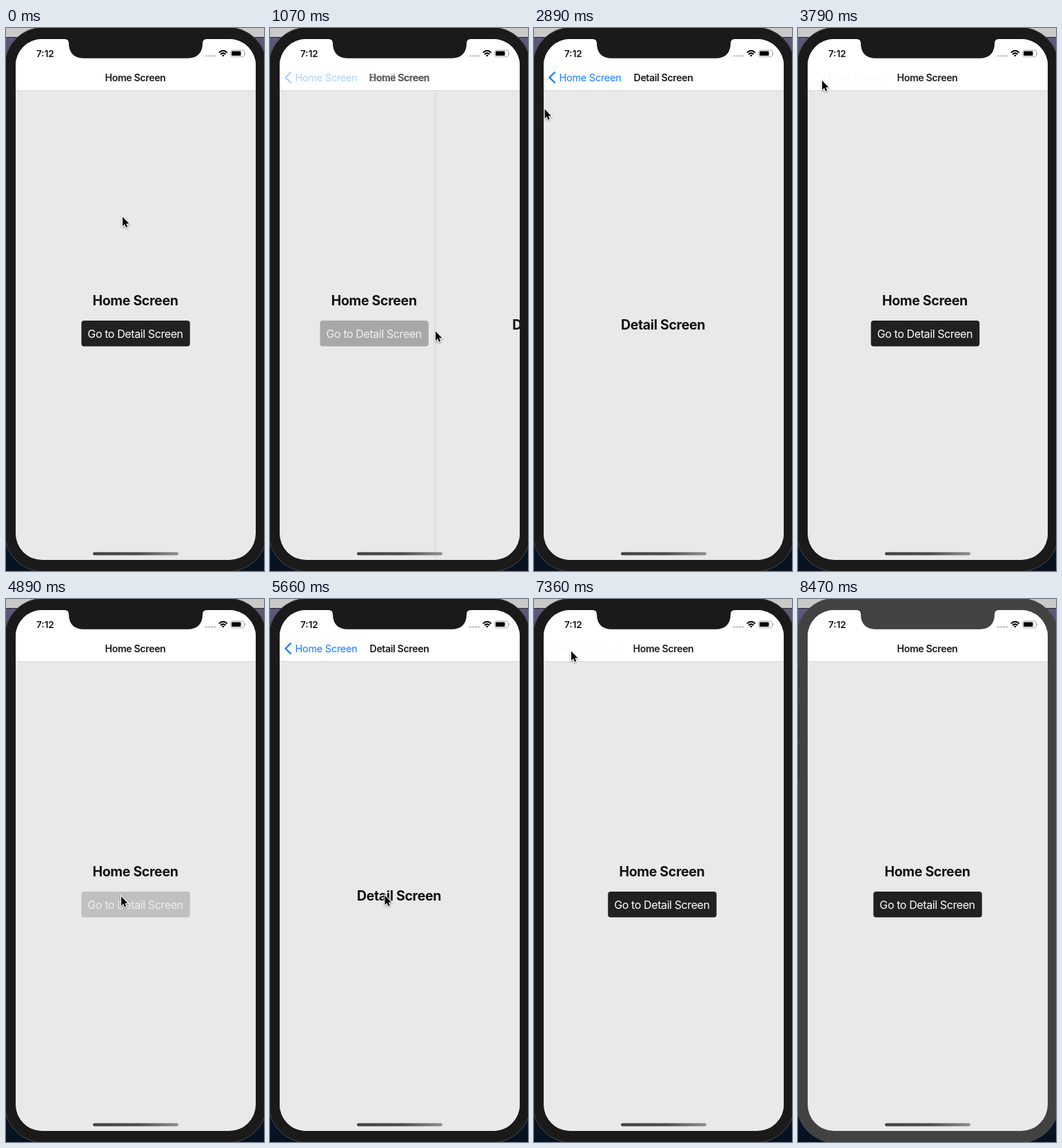
These frames come from a looping animation (374x785 px, 9020 ms). An HTML page:

```html
<!DOCTYPE html>
<html lang="en">
<head>
<meta charset="utf-8">
<title>Stack navigation</title>
<style>
  html, body { margin: 0; height: 100%; overflow: hidden; background: #0a1624; }
  svg { display: block; width: 100%; height: 100%; }
  text { font-family: Inter, "Open Sans", sans-serif; fill: #111; }
  .mid { text-anchor: middle; }
  .title { font-size: 14.2px; font-weight: 600; letter-spacing: -.4px; fill: #1c1c1e; }
  .heading { font-size: 19.5px; font-weight: 700; letter-spacing: -.33px; }
  .label { font-size: 16px; letter-spacing: -.4px; fill: #fff; }
  .back { font-size: 14.5px; letter-spacing: -.27px; fill: #147efb; }
  .clock { font-size: 13.5px; font-weight: 600; }
</style>
</head>
<body>
<svg viewBox="0 0 374 785" preserveAspectRatio="none">
  <defs>
    <clipPath id="screen"><rect x="14" y="16" width="348" height="753" rx="38"/></clipPath>
    <linearGradient id="backdrop" x2="0" y2="1">
      <stop stop-color="#645d80"/><stop offset=".1" stop-color="#4a4668"/>
      <stop offset=".8" stop-color="#0c1b2d"/><stop offset="1" stop-color="#061220"/>
    </linearGradient>
    <linearGradient id="edge">
      <stop stop-opacity="0"/><stop offset=".45" stop-opacity=".04"/><stop offset="1" stop-opacity="0"/>
    </linearGradient>
    <linearGradient id="bar">
      <stop stop-color="#444"/><stop offset=".55" stop-color="#505050"/><stop offset="1" stop-color="#929292"/>
    </linearGradient>
  </defs>

  <rect width="374" height="785" fill="url(#backdrop)"/>
  <rect width="374" height="13" fill="#c9c9c9"/>
  <rect y="13" width="374" height="1" fill="#25232e"/>
  <rect id="bezel" x="-2" y="-1" width="380" height="787" rx="56" stroke="#4b4b4b"/>
  <g id="sideButtons" fill="#383838">
    <rect y="100" width="2" height="29"/><rect y="153" width="2" height="51"/><rect y="210" width="2" height="51"/>
  </g>

  <g clip-path="url(#screen)">
    <rect x="14" y="16" width="348" height="753" fill="#e9e9e9"/>
    <g id="home">
      <text class="heading mid" x="187.5" y="401">Home Screen</text>
      <g id="button">
        <rect x="109.3" y="423" width="157.4" height="37.3" rx="4" fill="#212121"/>
        <text class="label mid" x="187.5" y="448">Go to Detail Screen</text>
      </g>
    </g>
    <g id="detail">
      <rect x="14" y="91" width="348" height="678" fill="#e9e9e9"/>
      <rect id="shadow" x="10.5" y="94" width="8" height="675" fill="url(#edge)"/>
      <text class="heading mid" x="187" y="436">Detail Screen</text>
    </g>

    <rect x="14" y="16" width="348" height="74.5" fill="#fff"/>
    <rect x="14" y="90" width="348" height="1" fill="#d9d9d9"/>
    <text id="homeTitle" class="title mid" x="187.5" y="76.5">Home Screen</text>
    <g id="detailHeader">
      <text class="title mid" x="187.5" y="76.5">Detail Screen</text>
      <path d="M30.5 63.5L22.5 71.5L30.5 79.5" fill="none" stroke="#147efb" stroke-width="2.3"/>
      <text class="back" x="36.5" y="76.5">Home Screen</text>
    </g>

    <text class="clock" x="44" y="42">7:12</text>
    <g fill="#c6c6c8">
      <circle cx="290.3" cy="40.3" r="1.6"/><circle cx="294.5" cy="40.3" r="1.6"/>
      <circle cx="298.7" cy="40.3" r="1.6"/><circle cx="302.9" cy="40.3" r="1.6"/>
    </g>
    <g fill="none" stroke="#000" stroke-width="2">
      <path d="M308.7 35.6Q314.7 29.8 320.7 35.6M310.9 38.1Q314.7 34.6 318.5 38.1"/>
      <path d="M312.7 39.5Q314.7 37.8 316.7 39.5L314.7 41.6Z" fill="#000" stroke="none"/>
    </g>
    <rect x="325.5" y="32" width="20" height="9.6" rx="2.8" fill="none" stroke="#a5a5a5"/>
    <rect x="327" y="33.5" width="13.5" height="6.6" rx="1.4"/>
    <path d="M346.6 35.2Q348.6 36.8 346.6 38.5Z" fill="#a5a5a5"/>
    <rect x="126" y="757.7" width="124" height="4.6" rx="2.3" fill="url(#bar)"/>
  </g>
  <path id="notch" d="M85 15V16Q91 16 91 22C91 36 99 43.7 112 43.7H264C277 43.7 285 36 285 22Q285 16 291 16V15Z"/>

  <path id="cursor" d="M0 0V13.5L3 10.6L5 15.3L7.2 14.3L5.2 9.8H9.4Z" stroke="#fff" stroke-width="2"
        paint-order="stroke" style="filter:drop-shadow(0 1px 1px #0006)"/>
</svg>

<script>
const LOOP = 9020, BLUR_AT = 8470, CURSOR_GONE = 8100;
const SCREEN_WIDTH = 348, PARALLAX = .3;
const OMEGA = Math.sqrt(1000 / 3);            // stiffness / mass

// start: spring origin, shown: first visible change
const transitions = [
  { start: 1003, shown: 1003, push: true },
  { start: 3506, shown: 3550, push: false },
  { start: 4935, shown: 4935, push: true },
  { start: 7041, shown: 7060, push: false },
];
const presses = [{ down: 960, up: 1003 }, { down: 4890, up: 4935 }];

// time, x, y of the pointer tip
const pointerPath = [
  [210, 169, 273], [330, 225, 325], [480, 289, 395], [590, 270, 428], [720, 240, 438.5],
  [2530, 240, 438.5], [2690, 15.5, 120.5], [2880, 15.5, 120.5], [2890, 15.5, 117.5],
  [3000, 22, 100], [3190, 35, 76], [3840, 35, 76], [4100, 95, 230], [4360, 161, 381],
  [4470, 161, 381], [4650, 167, 432], [4880, 167, 432], [4890, 167, 430], [5660, 167, 430],
  [5780, 112, 278], [5800, 112, 278], [6150, 75.5, 104.5], [6470, 75.5, 104.5],
  [6620, 58, 73], [6760, 54, 75.5], [7480, 54, 75.5], [7890, 283.5, 761],
  [8065, 283.5, 761], [8070, 299, 773],
];

const $ = id => document.getElementById(id);
const moveTo = (id, x, y = 0) => $(id).setAttribute("transform", `translate(${x} ${y})`);
const fade = (id, value) => $(id).setAttribute("opacity", value);

function spring(ms) {
  const x = OMEGA * ms / 1000;
  return 1 - (1 + x) * Math.exp(-x);
}

function easeInOut(u) {
  return u < .5 ? 2 * u * u : 1 - 2 * (1 - u) ** 2;
}

function buttonOpacity(t) {
  const press = presses.findLast(p => t >= p.down);
  if (!press) return 1;
  const u = Math.min(1, Math.max(0, (t - press.up) / 250));
  return .2 + .8 * easeInOut(u);
}

function pointerAt(t) {
  const next = pointerPath.findIndex(key => key[0] > t);
  if (next === 0) return pointerPath[0].slice(1);
  if (next < 0) return pointerPath.at(-1).slice(1);
  const [t0, x0, y0] = pointerPath[next - 1], [t1, x1, y1] = pointerPath[next];
  const u = (t - t0) / (t1 - t0);
  return [x0 + (x1 - x0) * u, y0 + (y1 - y0) * u];
}

function draw(t) {
  const current = transitions.findLast(item => t >= item.shown);
  const travelled = current ? spring(t - current.start) : 0;
  const p = current && !current.push ? 1 - travelled : travelled;

  moveTo("home", -SCREEN_WIDTH * PARALLAX * p);
  moveTo("detail", SCREEN_WIDTH * (1 - p));
  fade("shadow", current?.push ? 4 * p * (1 - p) : 0);
  fade("homeTitle", 1 - p);
  fade("detailHeader", p);
  fade("button", buttonOpacity(t));

  moveTo("cursor", ...pointerAt(t));
  fade("cursor", t < CURSOR_GONE ? 1 : 0);

  const inactive = t >= BLUR_AT, frameColor = inactive ? "#424242" : "#1a1a1a";
  $("bezel").setAttribute("fill", frameColor);
  $("notch").setAttribute("fill", frameColor);
  fade("sideButtons", inactive ? 1 : 0);
}

const began = performance.now();
function tick() {
  draw((performance.now() - began) % LOOP);
  requestAnimationFrame(tick);
}
tick();
</script>
</body>
</html>
```
